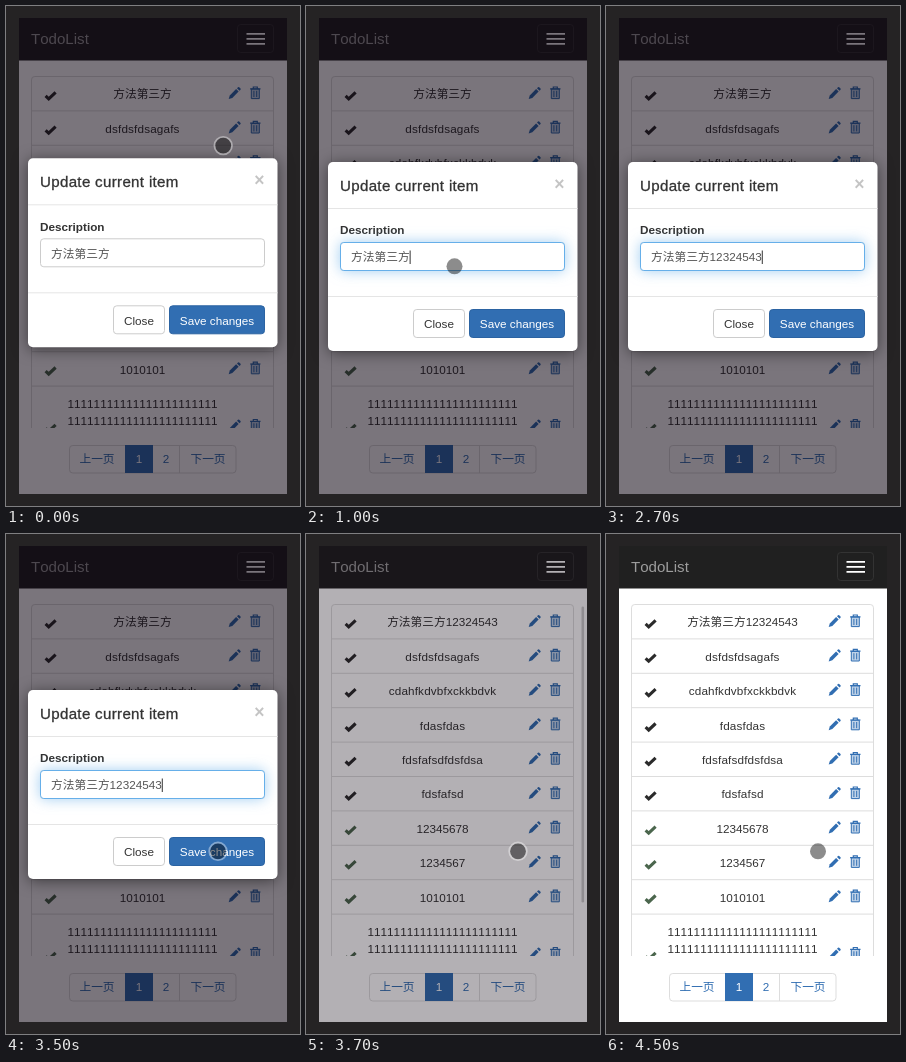
An HTML page that plays this animation: 294x500 px, repeating every 4.6 s.

```html
<!DOCTYPE html>
<html lang="en">
<head>
<meta charset="utf-8">
<title>Todo list</title>
<style>
  html, body { margin: 0; width: 100%; height: 100%; overflow: hidden; background: #252324; }
  svg { display: block; width: 294px; height: 500px; }
  text {
    font: 11.725px "Liberation Sans", "Noto Sans CJK SC", "Noto Sans CJK JP", "Noto Sans CJK", sans-serif;
    font-kerning: none;
    fill: #333;
  }
  .mid { text-anchor: middle; }
  .blue { fill: #316eb2; }
  .line { fill: none; stroke: #ddd; }
  .brand { font-size: 15.08px; fill: #9d9d9d; }
  .title { font-size: 15.08px; letter-spacing: .33px; stroke: #333; stroke-width: .3px; }
  .label { font-weight: bold; }
  .cross { font-size: 17.6px; font-weight: bold; fill: #c4c4c4; }
  .word { letter-spacing: .15px; }
  #panel { filter: drop-shadow(0 2.5px 7.5px rgba(0, 0, 0, .5)); }
  #glow { filter: drop-shadow(0 0 6.7px rgba(102, 175, 233, .6)); }
</style>
</head>
<body>
<svg viewBox="0 0 294 500">
  <defs>
    <path id="tick" d="M-5 .4L-1.9 3.3L5-3.2" fill="none" stroke-width="3.1"/>
    <g id="pencil" class="blue">
      <path d="M-6 6L-4.9 2.4L1.4-3.9L3.9-1.4L-2.4 4.9Z"/>
      <path d="M2.3-4.8L3.3-5.8Q3.9-6.3 4.5-5.8L5.8-4.5Q6.3-3.9 5.8-3.3L4.8-2.3Z"/>
    </g>
    <g id="trash" fill="none" stroke="#316eb2">
      <path d="M-4-4H4V5.6H-4Z" class="blue" fill-opacity=".3"/>
      <path d="M-5.2-4.2H5.2M-2-4.5V-6H2V-4.5" stroke-width="1.2"/>
      <path d="M-1.4-2.2V4M1.4-2.2V4"/>
    </g>
    <clipPath id="listClip"><rect x="13" y="60" width="268" height="362"/></clipPath>
  </defs>

  <rect width="294" height="500" fill="#252324"/>
  <rect x="13" y="12" width="268" height="476" fill="#fff"/>
  <rect x="13" y="12" width="268" height="42.5" fill="#202020"/>
  <text class="brand" x="25" y="38">TodoList</text>
  <rect x="231.5" y="18.5" width="36" height="28" rx="3.3" fill="none" stroke="#333"/>
  <path d="M240.5 27.8H259M240.5 32.8H259M240.5 37.8H259" stroke="#fff" stroke-width="1.7"/>

  <g clip-path="url(#listClip)">
    <rect class="line" x="25.5" y="70.5" width="242" height="400" rx="3.3"/>
    <g id="rows"></g>
  </g>
  <rect id="scrollbar" x="275.5" y="72.5" width="2.6" height="296" rx="1.3" fill="#000" opacity="0"/>

  <rect class="line" x="63.5" y="439.5" width="166.5" height="27.5" rx="3.3"/>
  <path class="line" d="M173.5 439.5V467"/>
  <rect class="blue" x="119" y="439" width="28" height="28"/>
  <text class="mid blue" x="91" y="457.3">上一页</text>
  <text class="mid" x="133" y="457.3" style="fill:#fff">1</text>
  <text class="mid blue" x="160" y="457.3">2</text>
  <text class="mid blue" x="202" y="457.3">下一页</text>

  <rect id="backdrop" x="13" y="12" width="268" height="476" fill="#0a000e"/>

  <g id="modal">
    <rect id="panel" x="22" y="156" width="249.5" height="189" rx="5" fill="#fff"/>
    <path d="M22 202.5H271.5M22 290.5H271.5" stroke="#e5e5e5"/>
    <text class="title" x="34" y="184.7">Update current item</text>
    <text class="cross mid" x="253.5" y="184">×</text>
    <text class="label" x="34" y="228.3">Description</text>
    <rect x="34.5" y="236.5" width="224" height="28" rx="3.3" fill="#fff" stroke="#ccc"/>
    <rect id="glow" x="34.5" y="236.5" width="224" height="28" rx="3.3" fill="#fff" stroke="#66afe9"/>
    <text id="value" x="45" y="255.3" style="fill:#555"></text>
    <rect id="caret" y="244.5" width="1" height="13.5" fill="#333"/>
    <rect x="107.5" y="303.5" width="51" height="28" rx="3.3" fill="#fff" stroke="#ccc"/>
    <text class="mid" x="133" y="322.3">Close</text>
    <rect class="blue" x="163.5" y="303.5" width="95" height="28" rx="3.3" stroke="#2b63a2"/>
    <text class="mid" x="211" y="322.3" style="fill:#fff">Save changes</text>
  </g>

  <g id="cursor">
    <circle r="8" fill="#000" fill-opacity=".45"/>
    <circle id="ring" r="8.8" fill="none" stroke="#fff" stroke-opacity=".4" stroke-width="1.8"/>
  </g>
</svg>

<script>
const LOOP = 4600, STEP = 100;
const FONT = 11.725, DIGIT = FONT * 0.556;
const BASE = "方法第三方", TYPED = "12324543";
const KEY_TIMES = [1400, 1500, 1700, 2000, 2100, 2300, 2400, 2600];
const ITEMS = [BASE, "dsfdsfdsagafs", "cdahfkdvbfxckkbdvk", "fdasfdas", "fdsfafsdfdsfdsa",
  "fdsfafsd", "12345678", "1234567", "1010101"];
const ROW = 34.4, TOP = 70.5;
const OPEN_AT = { x: 217.2, y: 139.6 }, FIELD = { x: 148.5, y: 260.3 }, SAVE = { x: 212, y: 317.3 };

const $ = id => document.getElementById(id);
const set = (id, attrs) => {
  for (const name in attrs) $(id).setAttribute(name, attrs[name]);
};
const progress = (t, from, to) => Math.min(1, Math.max(0, (t - from) / (to - from)));
const ease = p => p * p * (3 - 2 * p);
const mix = (a, b, p) => a + (b - a) * p;
const between = (t, from, to) => t >= from && t < to;

function icons(y, done) {
  return `<use href="#tick" x="44.6" y="${y + 1.5}" stroke="${done ? "#4b664d" : "#2b2b2b"}"/>
    <use href="#pencil" x="228.7" y="${y - 1}"/><use href="#trash" x="249.3" y="${y - 1}"/>`;
}

function buildRows() {
  const line = (s, y) => {
    const kind = /[a-z]/.test(s) ? "mid word" : "mid";
    return `<text class="${kind}" x="136.5" y="${y}">${s}</text>`;
  };
  let markup = ITEMS.map((item, i) => {
    const y = TOP + ROW * i + 17.5;
    return line(item, y + 4.3) + icons(y, i > 5) +
      `<path class="line" d="M25.5 ${TOP + ROW * (i + 1)}H267.5"/>`;
  }).join("");
  const ones = "1".repeat(23);
  markup += line(ones, 402) + line(ones, 418.7) + icons(420.5, true);
  $("rows").innerHTML = markup;
}

function cursorAt(t) {
  const [a, b, p] = t < 2000
    ? [OPEN_AT, FIELD, progress(t, 200, 800)]
    : [FIELD, SAVE, progress(t, 3000, 3400)];
  return { x: mix(a.x, b.x, ease(p)), y: mix(a.y, b.y, ease(p)) };
}

function render(t) {
  const typed = KEY_TIMES.filter(k => k <= t).length;
  const focused = t >= 800;
  $("value").textContent = BASE + TYPED.slice(0, typed);
  set("glow", { visibility: focused ? "inherit" : "hidden" });
  set("caret", {
    x: 45 + BASE.length * FONT + typed * DIGIT,
    visibility: focused ? "inherit" : "hidden"
  });

  const leaving = progress(t, 3500, 3650);
  const slide = -3.7 * (1 - progress(t, 0, 100)) - 36 * leaving;
  set("modal", {
    transform: `translate(0 ${slide})`,
    opacity: 1 - leaving,
    visibility: leaving < 1 ? "visible" : "hidden"
  });
  set("backdrop", { opacity: 0.54 * (1 - progress(t, 3600, 3835)) });
  $("rows").firstChild.textContent = t >= 3600 ? BASE + TYPED : BASE;
  set("scrollbar", { opacity: t >= 3700 ? 0.2 * (1 - progress(t, 3900, 4100)) : 0 });

  const { x, y } = cursorAt(t);
  const pressed = t < 200 || between(t, 800, 1000) || between(t, 3500, 3800);
  set("cursor", {
    transform: `translate(${x} ${y})`,
    visibility: between(t, 1300, 3100) ? "hidden" : "visible"
  });
  set("ring", { opacity: pressed ? 1 : 0 });
}

buildRows();
const start = performance.now();
function tick() {
  const t = (performance.now() - start) % LOOP;
  render(Math.floor(t / STEP) * STEP);
  requestAnimationFrame(tick);
}
tick();
</script>
</body>
</html>
```
